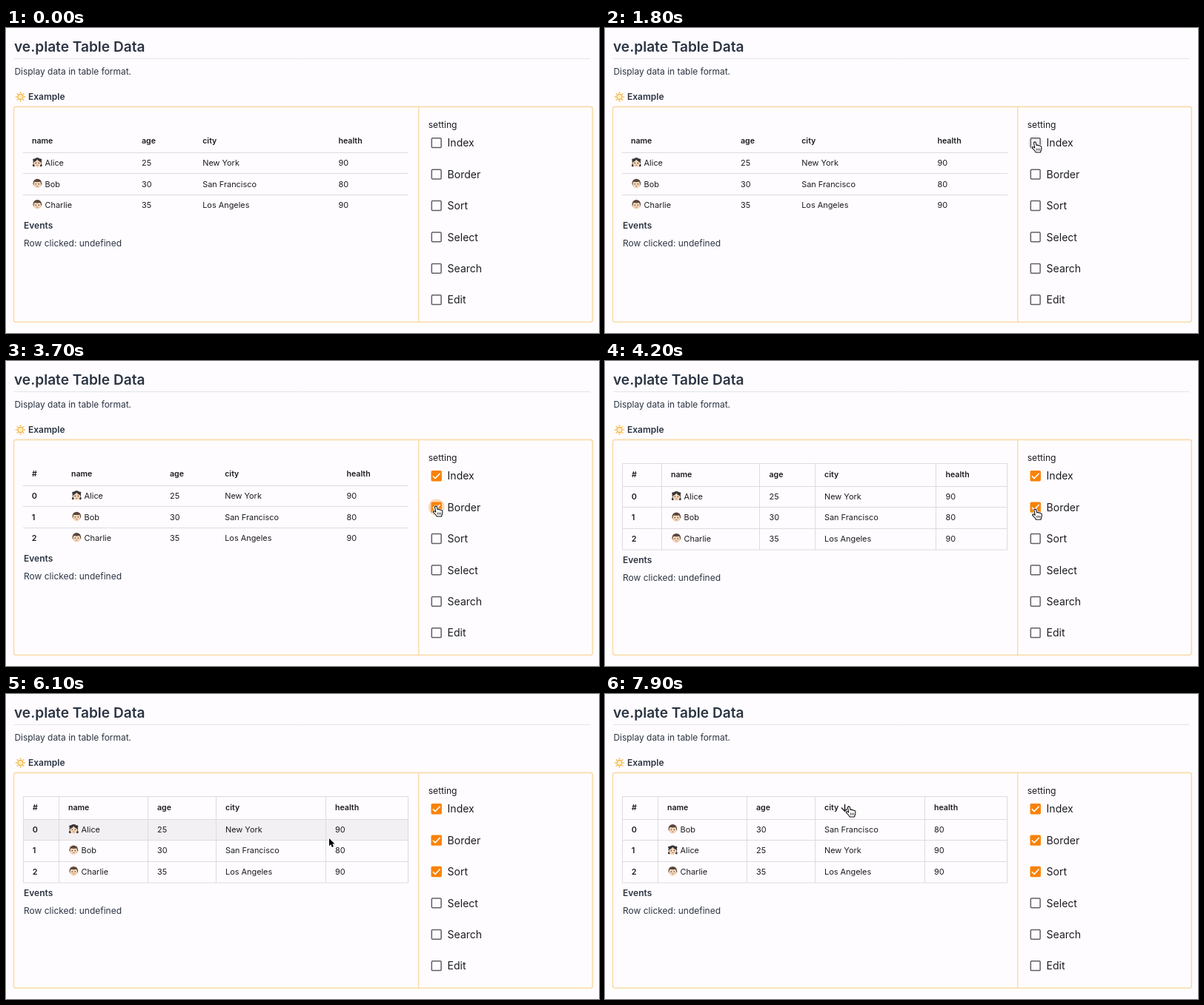
An HTML page with a canvas that plays this animation: 800 by 412 pixels, repeating every 8000 ms.

```html
<!DOCTYPE html>
<html lang="en">
<head>
<meta charset="utf-8">
<title>Table demo</title>
<style>
  html, body { margin: 0; width: 100%; height: 100%; overflow: hidden; background: #fefcff; }
  canvas { display: block; width: 800px; height: 412px; }
</style>
</head>
<body>
<canvas id="stage" width="800" height="412"></canvas>
<script>
const ctx = document.getElementById('stage').getContext('2d');
const LOOP = 8000, STEP = 100;
const INK = '#1c1b1f', SLATE = '#2b3442', ORANGE = '#f98206', FRAME = '#f9dcab', RULE = '#dddbe0';

const OPTIONS = ['Index', 'Border', 'Sort', 'Select', 'Search', 'Edit'];
const CHECKED_AT = [2000, 3500, 5200];
const TABLE_AT = [2200, 3800, 5400];
const ASCENDING_AT = 6900, DESCENDING_AT = 7500;

const PEOPLE = [
  ['Alice', 25, 'New York', 90],
  ['Bob', 30, 'San Francisco', 80],
  ['Charlie', 35, 'Los Angeles', 90]
];
// Text columns per layout: #, name, age, city, health
const COLUMNS = [
  [null, 35, 183, 265.2, 448.5],
  [35, 88, 221, 295.2, 459.5],
  [36, 89, 221.5, 296, 459.5],
  [36, 84, 204, 296, 444]
];
// Pointer path: time, x, y
const PATH = [
  [400, 678, 390], [1200, 565, 149], [1500, 565, 149], [1800, 580, 154],
  [3000, 580, 154], [3300, 580, 196], [4100, 580, 196], [4600, 584, 237],
  [5500, 584, 237], [6000, 436, 195], [6200, 436, 195], [6700, 329, 152], [LOOP, 329, 152]
];

function text(str, x, y, size, weight = 400, color = INK) {
  ctx.font = `${weight} ${size}px Inter, sans-serif`;
  ctx.fillStyle = color;
  ctx.fillText(str, x, y);
}

function line(points, color, width = 1) {
  ctx.beginPath();
  points.forEach(([x, y]) => ctx.lineTo(x, y));
  ctx.strokeStyle = color;
  ctx.lineWidth = width;
  ctx.stroke();
}

function oval(x, y, rx, ry, color) {
  ctx.beginPath();
  ctx.ellipse(x, y, rx, ry, 0, 0, Math.PI * 2);
  ctx.fillStyle = color;
  ctx.fill();
}

function box(x, y, w, h, r, color, width) {
  ctx.beginPath();
  ctx.roundRect(x, y, w, h, r);
  ctx.strokeStyle = color;
  ctx.lineWidth = width;
  ctx.stroke();
}

function pointerAt(t) {
  if (t < PATH[0][0]) return null;
  const i = PATH.findIndex(p => p[0] > t);
  const [t0, x0, y0] = PATH[i - 1], [t1, x1, y1] = PATH[i];
  const u = (t - t0) / (t1 - t0), k = u * u * (3 - 2 * u);
  return { x: x0 + (x1 - x0) * k, y: y0 + (y1 - y0) * k };
}

function sun(x, y) {
  for (let i = 0; i < 8; i++) {
    const a = i * Math.PI / 4;
    oval(x + 5.7 * Math.cos(a), y + 5.7 * Math.sin(a), 1, 1, '#f5bd5c');
  }
  oval(x, y, 4.2, 4.2, '#f3a936');
  oval(x, y, 3, 3, '#fff0bd');
}

function face(x, y, girl) {
  const hair = girl ? '#3a3335' : '#5a463c';
  if (girl) {
    for (const side of [-1, 1]) {
      oval(x + side * 4.6, y - 3.6, 1.5, 1.6, hair);
      oval(x + side * 4.9, y + 4, 1.5, 1.8, hair);
    }
  } else {
    oval(x, y + .6, 6.6, 1.6, '#e6bd9c');
  }
  oval(x, y - .5, 5.8, 5.8, hair);
  oval(x, y + 1, 4.9, 5.2, '#f4d6b8');
  if (girl) {
    ctx.beginPath();
    ctx.moveTo(x - 5, y - .5);
    ctx.quadraticCurveTo(x - 1, y - 1.5, x, y - 4.5);
    ctx.quadraticCurveTo(x + 1, y - 1.5, x + 5, y - .5);
    ctx.quadraticCurveTo(x + 4, y - 6, x, y - 6);
    ctx.quadraticCurveTo(x - 4, y - 6, x - 5, y - .5);
    ctx.fillStyle = hair;
    ctx.fill();
  } else {
    oval(x, y - 3.6, 4.5, 1.6, hair);
  }
  oval(x - 2, y + .8, .7, .8, '#3a2a24');
  oval(x + 2, y + .8, .7, .8, '#3a2a24');
  line([[x - 1.2, y + 3.7], [x + 1.2, y + 3.7]], '#bd6a57', .9);
}

function page(shift) {
  ctx.fillStyle = '#fefcff';
  ctx.fillRect(0, 0, 800, 412);
  text('ve.plate Table Data', 11, 32, 19.1, 600, SLATE);
  line([[11, 41.5], [788, 41.5]], '#e4e3e9');
  text('Display data in table format.', 11.5, 63.3, 11.95, 400, SLATE);
  sun(19.5, 93);
  text('Example', 30, 97.3, 12, 600, SLATE);
  box(10.5, 106.4, 780.8, 290.8, 3, FRAME, 1.6);
  line([[556.7, 106], [556.7, 397]], FRAME, 1.5);
  text('Events', 24, 271 + shift, 12, 600, SLATE);
  text('Row clicked: undefined', 24, 295.2 + shift, 12, 400, SLATE);
  text('setting', 569.7, 135, 12.1, 400, INK);
}

function sortArrow(x, y, angle, color) {
  ctx.save();
  ctx.translate(x, y);
  ctx.rotate(angle);
  line([[0, -4.7], [0, 4.7]], color, 1.4);
  line([[-4.7, 0], [0, 4.7], [4.7, 0]], color, 1.4);
  ctx.restore();
}

function table(t, layout, pointer) {
  const cols = COLUMNS[layout], bordered = layout > 1, sortable = layout > 2;
  const dy = bordered ? .8 : 0;
  const rowTop = i => Math.round(168 + dy + i * 28.4) + .5;
  const inside = pointer && pointer.x > 23 && pointer.x < 543;

  const rows = PEOPLE.slice();
  const sorted = t >= ASCENDING_AT;
  if (sorted) rows.sort((a, b) => (t >= DESCENDING_AT ? -1 : 1) * a[2].localeCompare(b[2]));

  rows.forEach((row, i) => {
    const top = rowTop(i), y = 186.2 + dy + i * 28.4;
    if (inside && pointer.y >= top && pointer.y < rowTop(i + 1)) {
      ctx.fillStyle = '#f2f0f3';
      ctx.fillRect(23, top, 520, rowTop(i + 1) - top);
    }
    line([[23, top], [543, top]], RULE);
    if (cols[0]) text(i, cols[0] - .3, y, 10.8, 600);
    face(cols[1] + 7.3, y - 4.6, row[0] === 'Alice');
    text(row[0], cols[1] + 17.6, y, 10.9);
    row.slice(1).forEach((value, c) => text(value, cols[c + 2], y, 10.9));
  });

  ['#', 'name', 'age', 'city', 'health'].forEach((label, c) => {
    if (cols[c]) text(label, cols[c], 156.3 + dy, 10.6, 600);
  });

  if (bordered) {
    box(23.5, 138.5, 519, 116.5, 0, RULE, 1);
    cols.slice(1).forEach(x => {
      const edge = Math.floor(x - 13) + .5;
      line([[edge, 138], [edge, 255]], RULE);
    });
  }

  const overCity = sortable && inside && pointer.x > 283 && pointer.x < 431 &&
    pointer.y > 138 && pointer.y < 169;
  if (sorted || overCity) {
    const turn = Math.min(1, Math.max(0, (t - DESCENDING_AT) / 200));
    sortArrow(323.5, 153.5, Math.PI * (1 - turn), sorted ? INK : '#a9a7ac');
  }
  return overCity;
}

function checkbox(i, t, pointer) {
  const x = 580.7, y = 155.2 + i * 42.4;
  const age = t - (CHECKED_AT[i] ?? Infinity);
  const over = pointer && Math.hypot(pointer.x - x, pointer.y - y) < 11;
  if (age >= 0 && age < 400) oval(x, y, 11, 11, '#fdd9b4');
  else if (over && age < 0) oval(x, y, 10, 10, '#efedf0');

  if (age >= 0) {
    ctx.beginPath();
    ctx.roundRect(x - 7.2, y - 7.2, 14.4, 14.4, 1.6);
    ctx.fillStyle = ORANGE;
    ctx.fill();
    line([[x - 4.8, y + .2], [x - 1.7, y + 3.3], [x + 4.9, y - 3.5]], '#fff', 1.6);
  } else {
    box(x - 6.4, y - 6.4, 12.8, 12.8, 1.2, '#626065', 1.5);
  }
  text(OPTIONS[i], 595.6, y + 5.2, 14);
  return over;
}

function drawPointer({ x, y }, hand) {
  ctx.save();
  ctx.translate(x, y);
  ctx.lineJoin = 'round';
  if (hand) {
    const shape = new Path2D('M-1.6 .8Q0-1 1.3 .8L2.2 4.6Q4 3.6 4.8 5Q6.4 4.2 7 5.6Q8.6 5 8.8 7' +
      'Q9.4 10 7.8 12.6L7.6 14H1.2Q0 11.5-2.6 9.4Q-4.6 7.4-3.2 6.7Q-1.8 6.4-.2 8Z');
    ctx.strokeStyle = '#fff';
    ctx.lineWidth = 2.6;
    ctx.stroke(shape);
    ctx.fillStyle = '#fff';
    ctx.fill(shape);
    ctx.strokeStyle = '#111';
    ctx.lineWidth = 1.1;
    ctx.stroke(shape);
    for (const fx of [2.4, 4.4, 6.4]) line([[fx, 8.6], [fx, 11.6]], '#111', .8);
  } else {
    const shape = new Path2D('M0 0V10.2L2.3 8.1L3.9 11.9L5.9 11L4.3 7.4H7.4Z');
    ctx.strokeStyle = '#fff';
    ctx.lineWidth = 2;
    ctx.stroke(shape);
    ctx.fillStyle = '#000';
    ctx.fill(shape);
  }
  ctx.restore();
}

function draw(now) {
  const t = Math.floor(now % LOOP / STEP) * STEP;
  const layout = TABLE_AT.filter(start => t >= start).length;
  const pointer = pointerAt(t);
  page(layout > 1 ? 1.5 : 0);
  let hand = table(t, layout, pointer);
  OPTIONS.forEach((_, i) => { hand = checkbox(i, t, pointer) || hand; });
  if (pointer) drawPointer(pointer, hand);
  requestAnimationFrame(() => draw(performance.now()));
}
draw(performance.now());
</script>
</body>
</html>
```
